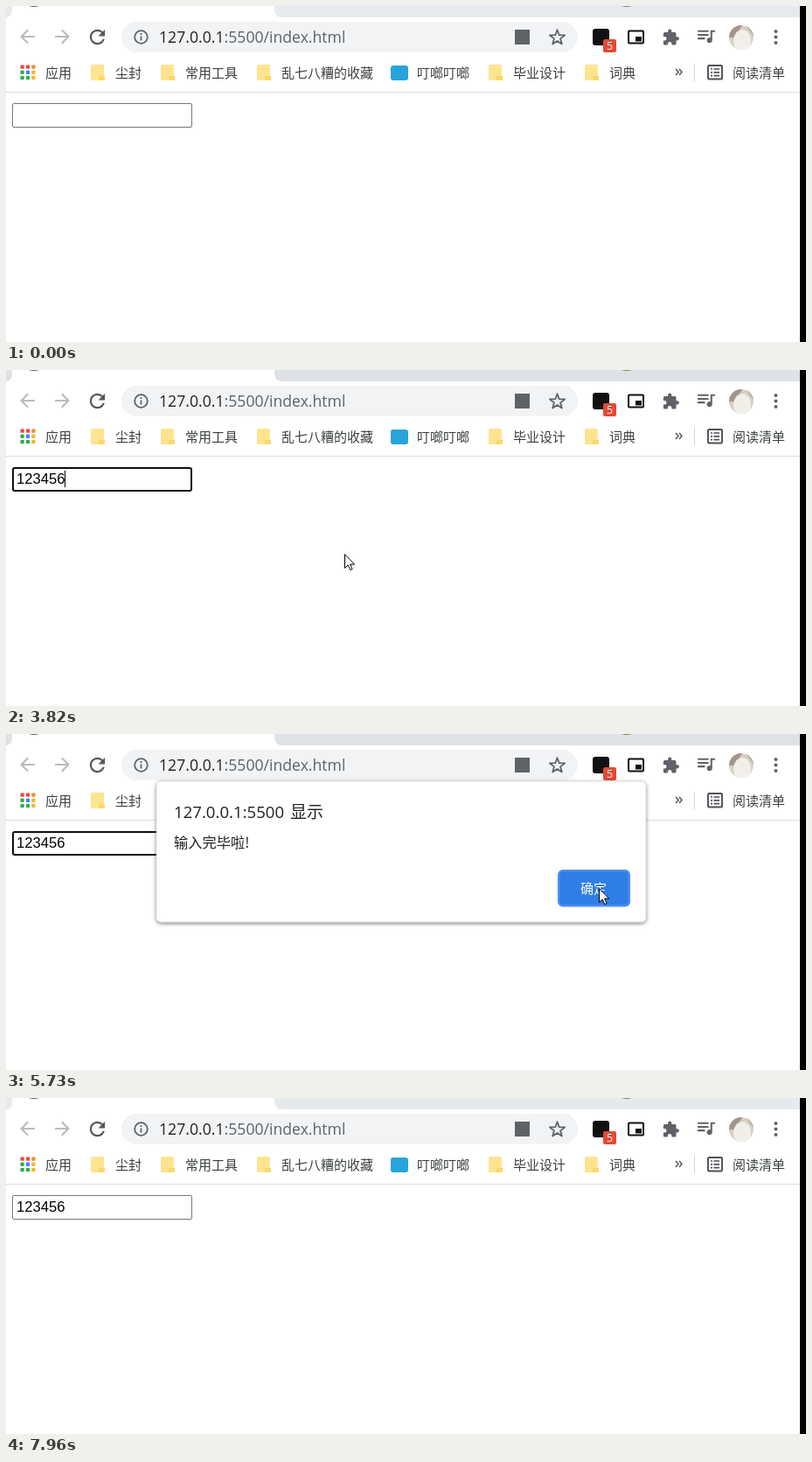
An HTML page for the animation above (8020 ms loop, 915 by 384 pixels).

```html
<!DOCTYPE html>
<html lang="zh-CN">
<head>
<meta charset="utf-8">
<title>Input demo</title>
<style>
html, body { margin: 0; width: 100%; height: 100%; overflow: hidden; background: #fff; }
svg { display: block; width: 915px; height: 384px; }
text { font-family: "Open Sans", "Noto Sans CJK SC", "Noto Sans CJK", sans-serif; white-space: pre; }
.cjk { font-family: "Noto Sans CJK SC", "Noto Sans CJK", sans-serif; }
.label { font-size: 15px; fill: #3c4043; }
.typed { font: 16.67px "Liberation Sans", Arial, sans-serif; }
</style>
</head>
<body>
<svg viewBox="0 0 915 384" xmlns="http://www.w3.org/2000/svg">
  <defs>
    <filter id="shade" x="-5%" y="-10%" width="110%" height="125%">
      <feDropShadow dx="0" dy="1.5" stdDeviation="2" flood-color="#000" flood-opacity=".5"/>
    </filter>
    <clipPath id="round"><circle cx="841" cy="36" r="14"/></clipPath>
    <g id="folder">
      <path d="M1.500 0H13.500Q15 0 15 1.500V18H1.500Q0 18 0 16.500V1.500Q0 0 1.500 0Z" fill="#ffe48f"/>
      <path d="M9 18V14.500Q9 13 10.500 13H16V17Q16 18 15 18Z" fill="#f9d767"/>
    </g>
  </defs>
  <rect width="915" height="384" fill="#fff"/>

  <path id="strip" d="M0 0H7V5Q7 12 0 13ZM307 0H908V13H317Q307 13 307 3Z"/>
  <path d="M26 0Q32 2 38 0" fill="#5f6368"/>
  <path id="speck" d="M704 0Q710 2 716 0"/>

  <g id="toolbar">
    <rect x="132" y="18" width="522" height="35" rx="17.500" fill="#f1f3f4"/>
    <g fill="none" stroke="#5f6368" stroke-width="1.800">
      <circle cx="154.500" cy="35.500" r="7.300"/>
      <path d="M154.500 34.500V39.500M154.500 31V33"/>
      <path id="star" stroke-linejoin="round"/>
    </g>
    <text x="175" y="42" font-size="17.640" fill="#202124">127.0.0.1<tspan fill="#5f6368">:5500/index.html</tspan></text>
    <rect x="582" y="27" width="17" height="17" fill="#5f6368"/>
    <rect x="671" y="26" width="19" height="19" rx="3" fill="#111"/>
    <rect x="683" y="38" width="15" height="15" rx="2" fill="#e24a33"/>
    <text x="690.500" y="50" font-size="12.500" fill="#fff" text-anchor="middle">5</text>
    <rect x="712" y="28.500" width="17" height="14" rx="1" fill="none" stroke="#111" stroke-width="2"/>
    <rect x="720" y="35" width="7" height="5.500" fill="#111"/>
    <g clip-path="url(#round)">
      <circle cx="841" cy="36" r="14" fill="#d5cfc6"/>
      <path d="M827 22H842L834 36H827Z" fill="#a39589"/>
      <path d="M846 22H856V36Z" fill="#b5ab92"/>
      <ellipse cx="842" cy="40" rx="10" ry="13" fill="#f0efea"/>
    </g>
    <g fill="#5f6368">
      <circle cx="880.500" cy="29" r="2"/><circle cx="880.500" cy="35.500" r="2"/><circle cx="880.500" cy="42" r="2"/>
    </g>
  </g>

  <g id="bookmarks">
    <rect x="440" y="68" width="20" height="17" rx="3" fill="#28a4dc"/>
    <path d="M766 72L769 75.500L766 79M770 72L773 75.500L770 79" fill="none" stroke="#5f6368" stroke-width="1.700"/>
    <path d="M787.500 66V86" stroke="#d0d3d7"/>
    <rect x="803" y="68" width="16" height="15.500" rx="1" fill="none" stroke="#4d5156" stroke-width="1.900"/>
    <path d="M806 72H808M806 75.800H808M806 79.600H808M809.500 72H816M809.500 75.800H816M809.500 79.600H816" stroke="#4d5156" stroke-width="1.700"/>
  </g>
  <path d="M0 98.500H908" stroke="#d9dbde"/>

  <rect id="field" fill="#fff"/>
  <text id="typed" class="typed" x="12" y="130"></text>
  <rect id="caret" y="115" width="1" height="19" fill="#000"/>

  <g id="dialog">
    <rect id="panel" y="54" height="161" rx="5" fill="#fff" stroke="#c4c4c4" stroke-width=".6" filter="url(#shade)"/>
    <text x="192" y="96" font-size="18.600" fill="#202124">127.0.0.1:5500</text>
    <text class="cjk" x="325" y="96" font-size="19" fill="#202124">显示</text>
    <text class="cjk" x="192" y="129.500" font-size="16.250" fill="#202124">输入完毕啦!</text>
    <rect id="button" x="632.300" y="156.300" width="80.400" height="39.900" rx="4.500" stroke-width="2.600"/>
    <text id="ok" class="cjk" y="182" font-size="15" fill="#fff">确定</text>
  </g>

  <path id="arrow" d="M.5 .7V16.500L4.200 13L6.800 18.600L9.100 17.600L6.600 12.100H11.600Z" fill="#fff" stroke="#000"/>
  <path id="beam" d="M-3 -7.500H-1Q.5 -7.500 .5 -6Q.5 -7.500 2 -7.500H4M.5 -6.500V6.500M-3 7.500H-1Q.5 7.500 .5 6Q.5 7.500 2 7.500H4" fill="none" stroke="#000"/>
  <rect x="908" width="7" height="384" fill="#000"/>
</svg>

<script>
const LOOP = 8020;
const $ = id => document.getElementById(id);
const set = (el, attrs) => { for (const k in attrs) el.setAttribute(k, attrs[k]); };
const show = (el, on) => el.style.display = on ? "" : "none";

function add(parent, tag, attrs, text = "") {
  const el = document.createElementNS("http://www.w3.org/2000/svg", tag);
  set(el, attrs);
  el.textContent = text;
  parent.appendChild(el);
  return el;
}

// Toolbar icons on a 24-unit grid, centred at x, y
function icon(x, y, scale, fill, d) {
  add($("toolbar"), "path", { d, fill, transform: `translate(${x} ${y}) scale(${scale}) translate(-12 -12)` });
}
icon(24.5, 35, 1.06, "#babcbe", "M20 11H7.83l5.59-5.59L12 4l-8 8 8 8 1.41-1.41L7.83 13H20z");
icon(64.5, 35, 1.06, "#babcbe", "M12 4l-1.41 1.41L16.17 11H4v2h12.17l-5.58 5.59L12 20l8-8z");
icon(104.5, 35.5, 1.08, "#54585d", "M17.65 6.35C16.2 4.9 14.21 4 12 4c-4.42 0-8 3.58-8 8s3.58 8 8 8c3.73 0 6.84-2.55 7.73-6h-2.08c-.82 2.33-3.04 4-5.65 4-3.31 0-6-2.69-6-6s2.69-6 6-6c1.66 0 3.14.69 4.22 1.78L13 11h7V4z");
icon(760.5, 36, .86, "#5f6368", "M20.5 11H19V7c0-1.1-.9-2-2-2h-4V3.5a2.5 2.5 0 0 0-5 0V5H4c-1.1 0-2 .9-2 2v3.8h1.5a2.7 2.7 0 0 1 0 5.4H2V20c0 1.1.9 2 2 2h3.8v-1.5a2.7 2.7 0 0 1 5.4 0V22H17c1.1 0 2-.9 2-2v-4h1.5a2.5 2.5 0 0 0 0-5z");
icon(800.5, 34, 1.04, "#5f6368", "M15 6H3v2h12zM15 10H3v2h12zM3 16h8v-2H3zM17 6v8.18a3 3 0 1 0 2 2.82V8h3V6z");

const starPoints = Array.from({ length: 10 }, (_, i) => {
  const a = i * Math.PI / 5, r = i % 2 ? 3.7 : 9;
  return `${630.5 + r * Math.sin(a)} ${36.2 - r * Math.cos(a)}`;
});
$("star").setAttribute("d", `M${starPoints.join("L")}Z`);

["#e94b3c", "#e94b3c", "#f08a35", "#35a853", "#3b86ef", "#f5b52a", "#35a853", "#35a853", "#f5b52a"].forEach((fill, i) =>
  add($("bookmarks"), "rect", { x: 16.5 + i % 3 * 6.4, y: 67.5 + (i / 3 | 0) * 6.2, width: 4.2, height: 4.2, fill }));
for (const x of [97, 177, 287, 552, 662]) add($("bookmarks"), "use", { href: "#folder", x, y: 67 });
[[45, "应用"], [125, "尘封"], [205, "常用工具"], [315, "乱七八糟的收藏"], [470, "叮啷叮啷"],
 [580, "毕业设计"], [690, "词典"], [831, "阅读清单"]].forEach(([x, s]) =>
  add($("bookmarks"), "text", { x, y: 81.5, class: "label cjk" }, s));

const keyTimes = [1770, 1970, 2100, 2370, 2570, 2770];
const caretOn = [[910, 1440], [1770, 3300], [3820, 4350], [6330, 6860], [7390, 7900]];

// Pointer moves: start, end, steps, then start, control and end points
const moves = [
  [450, 980, 9, [740, 318], [420, 250], [138, 125]],
  [3500, 3820, 6, [138, 125], [300, 248], [387, 210]],
  [5280, 5730, 8, [387, 210], [600, 152], [678, 176]],
  [6660, 6990, 4, [678, 176], [655, 165], [640, 158]],
  [7250, 7830, 9, [640, 158], [770, 230], [857, 390]],
];

// Dialog poses: time, vertical shift, opacity, extra width per side
const poses = [
  [4350, -20, .2, 1.5], [4410, -9, .6, 1], [4480, -3, .88, .5], [4550, -1, 1, 0], [4610, 0, 1, 0],
  [6260, -3, .92, .5], [6330, -11.5, .74, 1.5], [6390, -20, .28, 2], [6460, 0, 0, 0],
];

const latest = (list, t) => list.filter(e => e[0] <= t).pop();

function pointerAt(t) {
  const move = latest(moves, t);
  if (!move || t >= 7830) return null;
  const [t0, t1, n, a, b, c] = move;
  const step = Math.min(n, 1 + Math.floor((t - t0) / (t1 - t0) * (n - 1) + 1e-6));
  const q = step / n, p = q * q * (3 - 2 * q);
  return a.map((v, i) => Math.round((1 - p) ** 2 * v + 2 * p * (1 - p) * b[i] + p * p * c[i]));
}

function draw(t) {
  const active = t >= 910 && t < 7900;
  $("strip").setAttribute("fill", active ? "#dee1e6" : "#e7eaed");
  $("speck").setAttribute("fill", active ? "#85812c" : "#777");
  set($("field"), active
    ? { x: 8, y: 112, width: 204, height: 26, rx: 2, stroke: "#101010", "stroke-width": 2 }
    : { x: 7.5, y: 111.5, width: 205, height: 27, rx: 1.5, stroke: "#767676", "stroke-width": 1 });

  const count = keyTimes.filter(k => k <= t).length;
  $("typed").textContent = "123456".slice(0, count);
  $("caret").setAttribute("x", Math.floor(12 + count * 9.2));
  show($("caret"), caretOn.some(([a, b]) => t >= a && t < b));

  const [, dy, alpha, grow] = latest(poses, t) || [0, 0, 0, 0];
  const dialog = $("dialog");
  show(dialog, alpha > 0);
  set(dialog, { transform: `translate(0 ${dy})`, opacity: alpha });
  set($("panel"), { x: 172 - grow, width: 560 + 2 * grow });

  // The focus ring goes away once the button is pressed
  const pos = pointerAt(t);
  const hover = pos && t >= 5280 && pos[0] >= 631 && pos[1] < 198;
  const closing = t >= 6260;
  set($("button"), { fill: hover ? "#2f7de6" : "#1a73e8", stroke: closing ? "none" : "#4b8df0" });
  $("ok").setAttribute("x", closing ? 658 : 657);

  const overField = pos && pos[0] > 7 && pos[0] < 213 && pos[1] > 111 && pos[1] < 139;
  show($("arrow"), pos && !overField);
  show($("beam"), overField);
  if (pos) set($(overField ? "beam" : "arrow"), { transform: `translate(${pos})` });
}

const start = performance.now();
function tick() {
  draw((performance.now() - start) % LOOP);
  requestAnimationFrame(tick);
}
tick();
</script>
</body>
</html>
```
